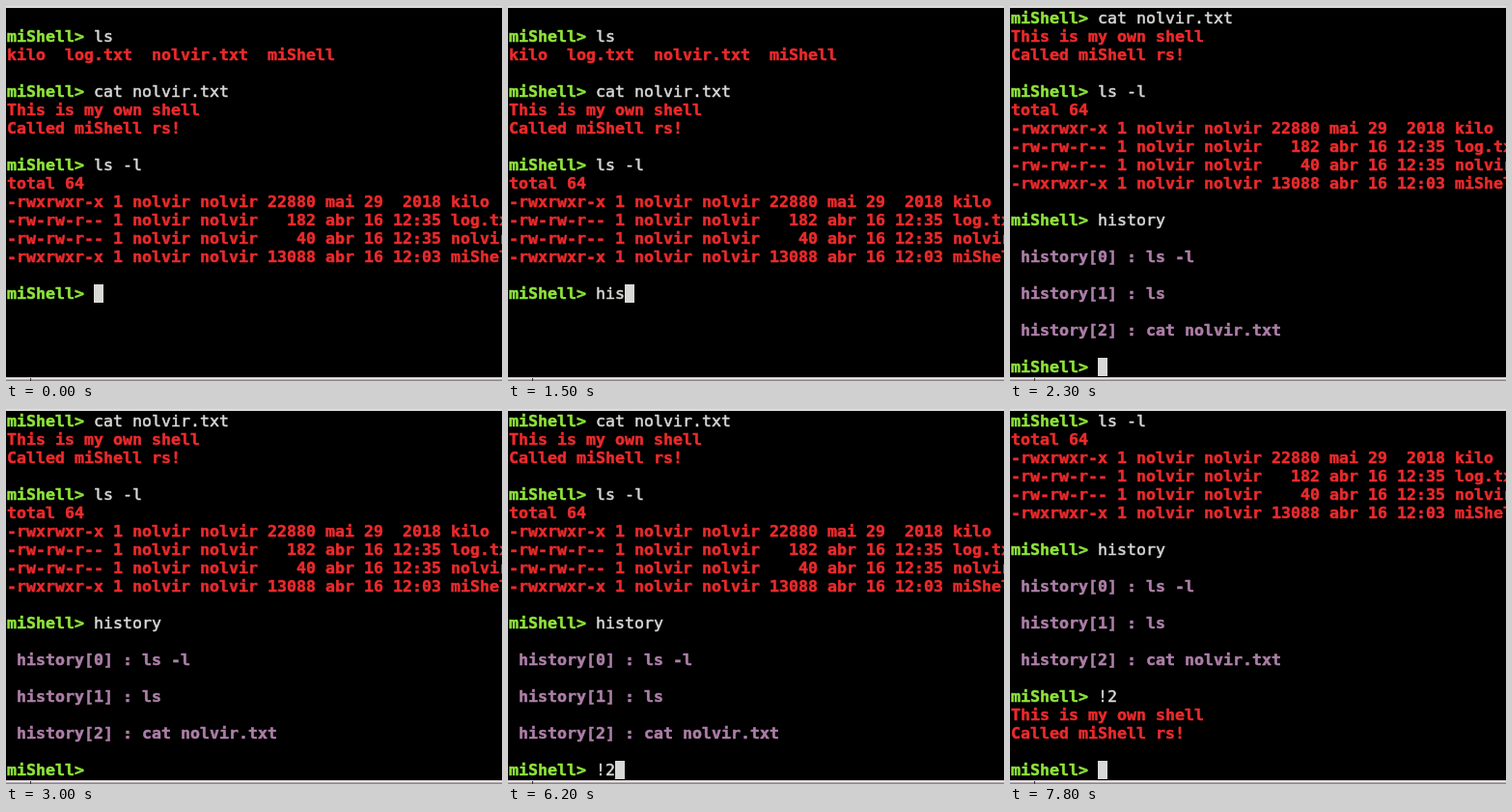
Write an HTML page with a canvas that moves like this. It is 514 px wide and 388 px high and loops after 8000 ms.

```html
<!DOCTYPE html>
<html lang="en">
<head>
<meta charset="utf-8">
<title>Shell session</title>
<style>
  html, body { margin: 0; width: 100%; height: 100%; overflow: hidden; background: #000; }
  canvas { display: block; }
</style>
</head>
<body>
<canvas id="screen" width="514" height="388"></canvas>
<script>
const ctx = document.getElementById('screen').getContext('2d');

const LOOP = 8000, BLINK = 600;
const CELL_W = 10, CELL_H = 19, LEFT = 1, TOP = 3, ROWS = 20;
const FONT = '16.6px "DejaVu Sans Mono", monospace';
const GREEN = '#8ee43a', RED = '#ec2a2c', PURPLE = '#ad7fa8', GRAY = '#d8d8d6';
const PROMPT = 'miShell> ';

const output = (color, text) => text.split('\n').map(line => ({ color, text: line }));
const command = text => ({ command: text });
const blank = command(null);

const fileText = output(RED, 'This is my own shell\nCalled miShell rs!');
const opening = [
  blank,
  command('ls'),
  ...output(RED, 'kilo  log.txt  nolvir.txt  miShell'),
  blank,
  command('cat nolvir.txt'),
  ...fileText,
  blank,
  command('ls -l'),
  ...output(RED, `total 64
-rwxrwxr-x 1 nolvir nolvir 22880 mai 29  2018 kilo
-rw-rw-r-- 1 nolvir nolvir   182 abr 16 12:35 log.txt
-rw-rw-r-- 1 nolvir nolvir    40 abr 16 12:35 nolvir.txt
-rwxrwxr-x 1 nolvir nolvir 13088 abr 16 12:03 miShell`),
  blank
];
const historyList = output(PURPLE,
  '\n history[0] : ls -l\n\n history[1] : ls\n\n history[2] : cat nolvir.txt\n');

// Each command: the time of every keystroke, then Enter and what it prints.
const session = [
  { text: 'history', keys: [1200, 1400, 1500, 1600, 1700, 1900, 2000], enter: 2300, result: historyList },
  { text: '!2', keys: [3400, 6100], enter: 6600, result: [...fileText, blank] }
];

function stateAt(time) {
  const lines = [...opening];
  let typed = '', lastKey = -100;
  for (const { text, keys, enter, result } of session) {
    const pressed = keys.filter(key => key <= time);
    if (pressed.length) lastKey = pressed[pressed.length - 1];
    typed = text.slice(0, pressed.length);
    if (time < enter) break;
    lines.push(command(text), ...result);
    typed = '';
    lastKey = enter;
  }
  lines.push(command(typed));
  const cursorOn = Math.floor((time - lastKey) / BLINK) % 2 === 0;
  return { lines: lines.slice(-ROWS), column: PROMPT.length + typed.length, cursorOn };
}

function rect(color, x, y, width, height) {
  ctx.fillStyle = color;
  ctx.fillRect(x, y, width, height);
}

// A thin outline gives the glyphs the heavier stems of terminal text.
function write(text, column, row, color, weight) {
  ctx.font = weight + ' ' + FONT;
  ctx.fillStyle = ctx.strokeStyle = color;
  ctx.lineWidth = 0.5;
  ctx.lineJoin = 'round';
  [...text].forEach((char, i) => {
    const x = LEFT + (column + i) * CELL_W, y = TOP + row * CELL_H + 15;
    ctx.fillText(char, x, y);
    ctx.strokeText(char, x, y);
  });
}

function draw(time) {
  const { lines, column, cursorOn } = stateAt(time);
  rect('#000', 0, 0, 514, 388);
  lines.forEach((line, row) => {
    if (line.color) {
      write(line.text, 0, row, line.color, 'bold');
    } else if (line.command !== null) {
      write(PROMPT, 0, row, GREEN, 'bold');
      write(line.command, PROMPT.length, row, GRAY, 'normal');
    }
  });
  if (cursorOn) {
    rect(GRAY, LEFT + column * CELL_W, TOP + (lines.length - 1) * CELL_H, CELL_W, CELL_H);
  }

  // Window edges
  rect('#dcdcda', 0, 0, 514, 2);
  rect('#c4c0c0', 384, 384, 0, 0);
  rect('#c4c0c0', 0, 384, 514, 1);
  rect('#eeecea', 0, 385, 514, 1);
  rect('#b4acb0', 0, 386, 514, 1);
  rect('#8a8488', 0, 387, 514, 1);
  rect('#33312e', 25, 385, 1, 3);
}

const start = performance.now();
function tick() {
  draw((performance.now() - start) % LOOP);
  requestAnimationFrame(tick);
}
tick();
</script>
</body>
</html>
```
